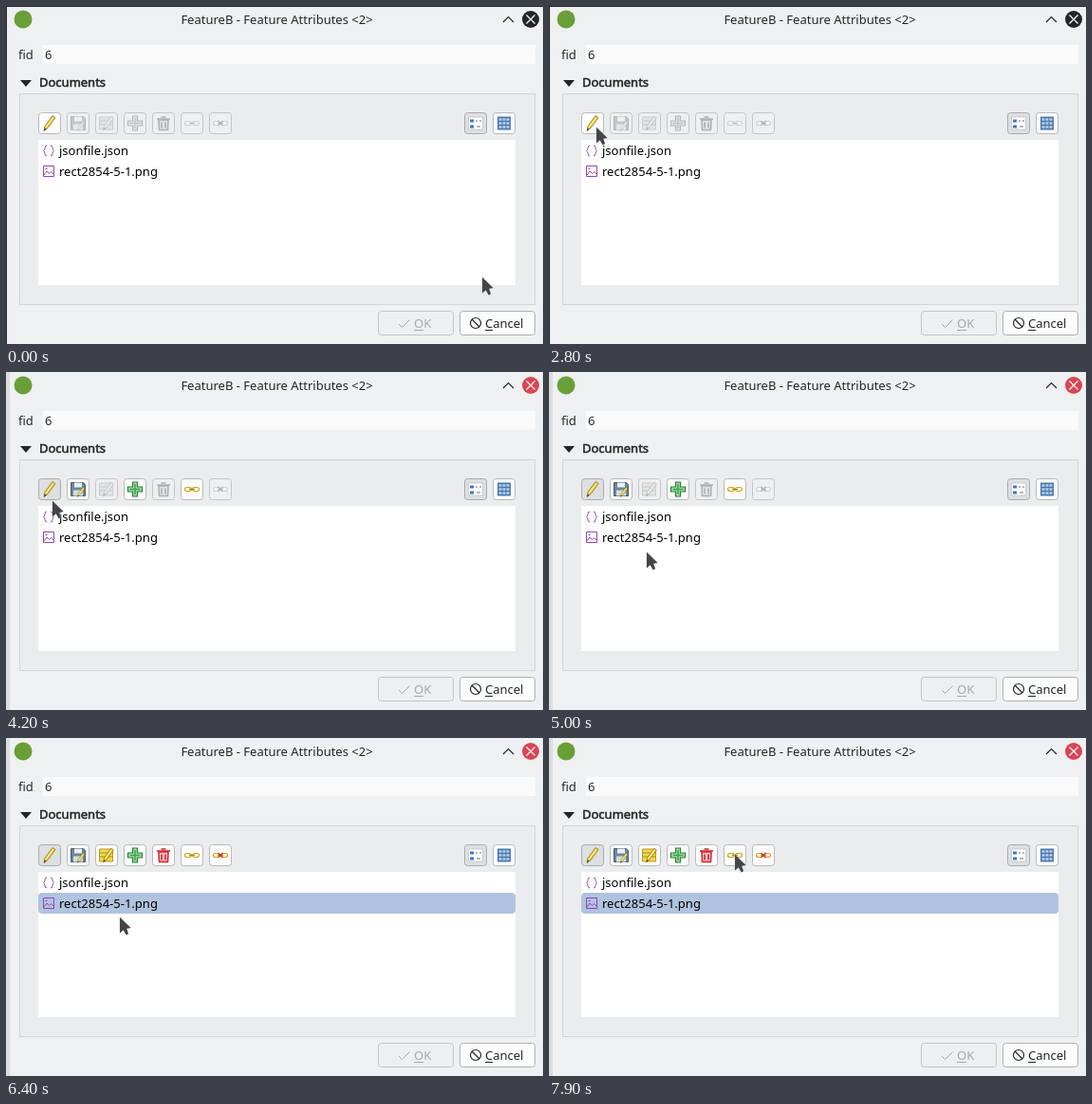
These frames come from a looping animation (566 px wide and 356 px high, 8000 ms). An HTML page:

```html
<!DOCTYPE html>
<html lang="en">
<head>
<meta charset="utf-8">
<title>Feature Attributes</title>
<style>
  html, body { margin: 0; width: 100%; height: 100%; overflow: hidden; background: #eff0f1; }
  svg { display: block; }
  text { font: 13px "Noto Sans", sans-serif; fill: #232629; white-space: pre; }
  .button { fill: #fcfcfc; stroke: #b7b9ba; }
  .checked .button { fill: #dedfe0; stroke: #a9abad; }
  .off .button { fill: #eeeff0; stroke: #c3c5c6; }
  .off .icon { filter: grayscale(1); opacity: .38; }
  .off text { fill: #a6a8aa; }
  .line { fill: none; stroke: #232629; }
</style>
</head>
<body>
<svg id="stage" width="566" height="356" viewBox="0 0 566 356">
  <defs>
    <g id="pencil">
      <path d="M3-8 6-6-2 5-6 8-5 3Z" fill="#f2d64b" stroke="#8d7a2b" stroke-width=".9"/>
      <path d="M4.3-6.5-4 4" stroke="#fff3a5" stroke-width="1"/>
      <path d="M-5 5-6 8-3.5 6.3Z" fill="#3c3c3c"/>
    </g>
    <g id="link" fill="#fffbe0" stroke="#c9a51f" stroke-width="1.2">
      <rect x="-7.5" y="-2" width="7" height="4" rx="2"/>
      <rect x=".5" y="-2" width="7" height="4" rx="2"/>
      <path d="M-3 0H3" stroke="#a98a18" stroke-width="1.4"/>
    </g>
  </defs>

  <rect width="566" height="356" fill="#eff0f1"/>
  <path id="darkEdge" d="M0 .5H566M.5 0V356" stroke="#2b2d2f"/>
  <rect id="lightEdge" width="4" height="356" fill="#dcddde"/>

  <circle cx="18" cy="14" r="9.5" fill="#6a9f38"/>
  <text x="285.5" y="19" text-anchor="middle">FeatureB - Feature Attributes &lt;2&gt;</text>
  <path class="line" d="M524 17 529.5 11.5 535 17" stroke-width="1.2"/>
  <circle id="close" cx="553" cy="14" r="9"/>
  <path d="M548.5 9.5l9 9m0-9l-9 9" stroke="#fcfcfc" stroke-width="1.2"/>

  <text x="13" y="56">fid</text>
  <rect x="39" y="41" width="519" height="20" fill="#fafafb"/>
  <text x="41" y="56">6</text>
  <path d="M15 78H27L21 85Z" fill="#232629"/>
  <text x="35" y="85" stroke="#232629" stroke-width=".55">Documents</text>

  <rect x="14.5" y="92.5" width="543" height="222" fill="#ebecee" stroke="#d2d4d5"/>
  <g id="tools"></g>

  <rect x="34" y="141" width="503" height="153" fill="#fff"/>
  <rect id="selection" x="34" y="163" width="503" height="22" rx="4" fill="#b0c3df"/>
  <g fill="none" stroke="#9146b5">
    <path d="M43 147q-2 0-2 2.5 0 2.500-1.500 3 1.500.5 1.500 3 0 2.500 2 2.500M47 147q2 0 2 2.500 0 2.500 1.500 3-1.500.5-1.500 3 0 2.500-2 2.500"/>
    <path d="M39.500 168.500h11v11h-11zM40 178l3-4 2.500 2.500 2-2 3 3M41.500 171.500h2"/>
  </g>
  <g style="--ink:#000">
    <text x="56" y="157" style="fill:#000">jsonfile.json</text>
    <text x="56" y="179" style="fill:#000">rect2854-5-1.png</text>
  </g>

  <g class="off">
    <rect class="button" x="392.500" y="321.500" width="79" height="25" rx="3"/>
    <path class="line" d="M414 335l3.500 3.500 8-8" style="stroke:#a6a8aa"/>
    <text x="430" y="339">OK</text>
    <path d="M430 341.500h10" stroke="#a6a8aa"/>
  </g>
  <g>
    <rect class="button" x="478.500" y="321.500" width="79" height="25" rx="3" style="stroke:#aeb0b1"/>
    <g class="line" stroke-width="1.200"><circle cx="495" cy="334" r="5.500"/><path d="M491 330l8 8"/></g>
    <text x="505" y="339">Cancel</text>
    <path d="M505 341.500h8" stroke="#232629"/>
  </g>

  <path id="cursor" d="M1 .7V17.500L4.700 14.300 7.700 19.500 10 18.300 8.200 12.800 12.500 12Z"
        fill="#434547" stroke="#d9dadb" stroke-width=".7" paint-order="stroke" stroke-linejoin="round"/>
</svg>

<script>
const $ = id => document.getElementById(id);
const LOOP = 8000, STEP = 100;
const FOCUS = 3100, EDITING = 3200, SELECTED = 5600;

// Icons are drawn around the centre of their button; "from" is when the tool becomes enabled.
const tools = [
  { id: 'edit', x: 34, from: 0, icon: '<use href="#pencil"/>' },
  { id: 'save', x: 64, from: EDITING, icon: `
    <path d="M-7.500-7H5.500L7.500-5V7H-7.500Z" fill="#6d8798" stroke="#465c6b"/>
    <path d="M-4-7H4V-2H-4Z" fill="#e9eef1"/><path d="M-5 1H5V7H-5Z" fill="#d5dde2"/>
    <use href="#pencil" transform="translate(3 3) scale(.62)"/>` },
  { id: 'form', x: 94, from: SELECTED, icon: `
    <path d="M-7.500-6.500H6.500V6.500H-7.500Z" fill="#f5d84e" stroke="#b59725"/>
    <path d="M-7-2.500H6M-7 1.500H6" stroke="#a98a1d"/>
    <use href="#pencil" transform="translate(2 0) scale(.9)"/>` },
  { id: 'add', x: 124, from: EDITING, icon: `
    <path d="M-2.500-7.500h5v5h5v5h-5v5h-5v-5h-5v-5h5z" fill="#a5dcab" stroke="#2b7d38" stroke-width="1.200"/>
    <path d="M0-5.500V5.500M-5.500 0H5.500" stroke="#39a34a" stroke-width="1.500"/>` },
  { id: 'remove', x: 154, from: SELECTED, icon: `
    <path d="M-5-3.500H5L4.500 7H-4.500Z" fill="#f6c3c5" stroke="#d0202b" stroke-width="1.500"/>
    <path d="M-7-4.500H7M-2.500-6.500H2.500M-2-1V5M2-1V5" stroke="#d0202b" stroke-width="1.500"/>` },
  { id: 'join', x: 184, from: EDITING, icon: '<use href="#link"/>' },
  { id: 'unjoin', x: 214, from: SELECTED, icon: `
    <use href="#link"/><path d="M-2.500-2.500l5 5m0-5l-5 5" stroke="#cf3038" stroke-width="1.300"/>` },
  { id: 'formView', x: 483, from: 0, icon: `
    <path d="M-7.500-6.500h15v13h-15z" fill="#fff" stroke="#c7cbd0"/>
    <path d="M-6-4h4v3h-4zM-6 2h4v3h-4z" fill="#3d79b8"/>
    <path d="M0-2.500H2M4-2.500H6M1 3.500H5" stroke="#6b7178"/>` },
  { id: 'tableView', x: 513, from: 0, icon: `
    <path d="M-7-7H7V7H-7Z" fill="#4a78b0"/>
    <path d="M-5.500-4H5.500M-5.500 0H5.500M-5.500 4H5.500" stroke="#b9d0ec" stroke-width="2.500" stroke-dasharray="3 1"/>` },
];

$('tools').innerHTML = tools.map(({ id, x, icon }) => `
  <g id="${id}">
    <rect class="button" x="${x + .5}" y="112.500" width="23" height="22" rx="3"/>
    <g class="icon" transform="translate(${x + 12} 123.500)" fill="none">${icon}</g>
  </g>`).join('');

// Each stroke starts at its time and advances one point per step, then rests.
const strokes = [
  [0, '501,285'],
  [1000, '405,274 313,258'],
  [1300, '292,250 246,228 190,196 146,173 115,157 93,146 74,139 57,134 59,136'],
  [2300, '41,119 51,129'],
  [2600, '50,128'],
  [2800, '49,127'],
  [4200, '48,135 50,147 57,165 68,185 80,201 90,210'],
  [4900, '96,203 102,189 106,178 107,174'],
  [6300, '112,178 119,188 110,206 92,222 75,232 66,235'],
  [7100, '67,234 88,246 135,251 202,244 255,220 269,185 250,152 217,130 195,122'],
].map(([start, points]) => ({ start, points: points.split(' ') }));

function cursorAt(time) {
  const { start, points } = strokes.findLast(stroke => stroke.start <= time);
  return points[Math.min(points.length - 1, Math.floor((time - start) / STEP))];
}

function draw(time) {
  const focused = time >= FOCUS;
  $('darkEdge').style.display = focused ? 'none' : '';
  $('lightEdge').style.display = focused ? '' : 'none';
  $('close').setAttribute('fill', focused ? '#da4453' : '#232629');
  $('selection').style.display = time >= SELECTED ? '' : 'none';
  for (const { id, from } of tools) {
    const checked = id === 'formView' || (id === 'edit' && focused);
    $(id).setAttribute('class', time < from ? 'off' : checked ? 'checked' : '');
  }
  $('cursor').setAttribute('transform', `translate(${cursorAt(time)})`);
}

const begin = performance.now();
function tick() {
  draw((performance.now() - begin) % LOOP);
  requestAnimationFrame(tick);
}
tick();
</script>
</body>
</html>
```
